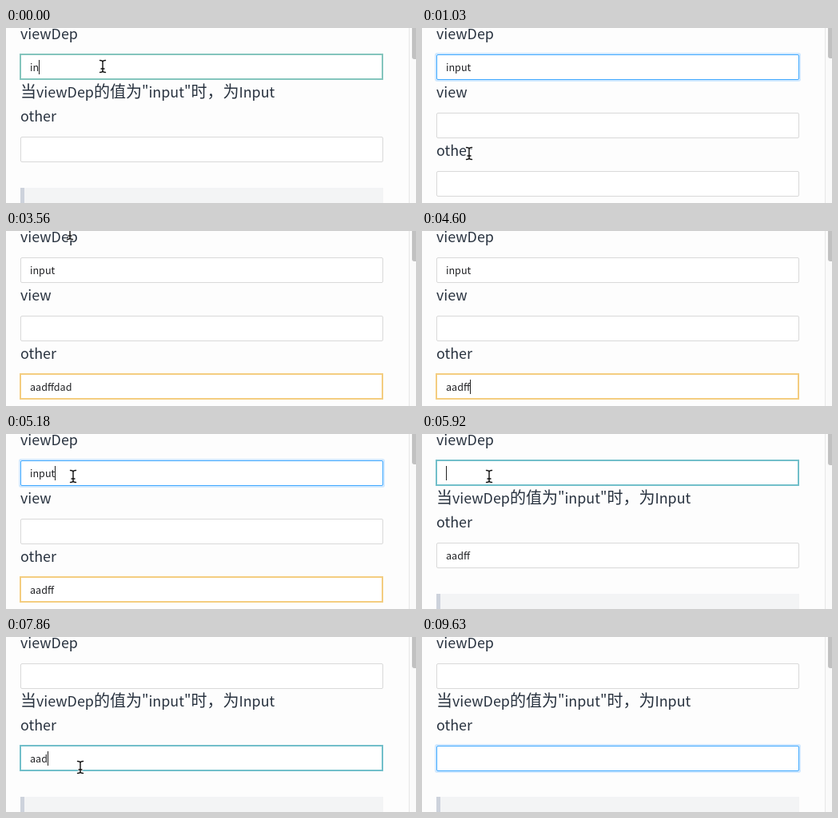
An HTML page for the animation above (9.73 s loop, 513x219 px).

```html
<!DOCTYPE html>
<html lang="zh-CN">
<head>
<meta charset="utf-8">
<style>
  html, body { margin: 0; width: 100%; height: 100%; overflow: hidden; background: #fdfdfd; }
  svg { display: block; }
  text { font-family: "Noto Sans CJK SC", "Noto Sans CJK", "Noto Sans", sans-serif; }
  .label { font-size: 17.9px; fill: #28323f; }
  .label .han { font-size: 20px; }
  .value { font-size: 12.55px; fill: #202124; }
</style>
</head>
<body>
<svg id="stage" width="513" height="219" viewBox="0 0 513 219">
  <g id="quote">
    <rect x="18" y="200" width="454" height="19" fill="#f3f4f5"/>
    <rect x="18" y="200" width="5" height="19" fill="#cdd2dc"/>
  </g>
  <text class="label" x="18" y="14">viewDep</text>
  <text class="label" x="18" y="87" id="viewLabel">view</text>
  <text class="label" x="18" y="87" id="hint"><tspan class="han">当</tspan>viewDep<tspan class="han">的值为</tspan>"input"<tspan class="han">时，为</tspan>Input</text>
  <text class="label" x="18" id="otherLabel">other</text>
  <g id="fields"></g>
  <rect x="504" width="9" height="219" fill="#fafafa"/>
  <rect x="504" width="1" height="219" fill="#e7e7e7"/>
  <rect id="thumb" x="508" y="-10" width="9" rx="3" fill="#c1c1c1"/>
  <g id="mouse" fill="none" stroke-linecap="round">
    <path d="M-3.5-7.5Q0-7.5 0-5.5Q0-7.5 3.5-7.5M0-5.5V5.5M-3.5 7.5Q0 7.5 0 5.5Q0 7.5 3.5 7.5M-2 3H2" stroke="#fff" stroke-width="3"/>
    <path d="M-3.5-7.5Q0-7.5 0-5.5Q0-7.5 3.5-7.5M0-5.5V5.5M-3.5 7.5Q0 7.5 0 5.5Q0 7.5 3.5 7.5M-2 3H2" stroke="#111" stroke-width="1.4"/>
  </g>
</svg>
<script>
const LOOP = 9730;
const BLUE = 'blue', GREY = 'grey';
const TEAL = '#84c5bd', AQUA = '#72bfca', GREEN = '#a7c8b3', AMBER = '#f4cd80';

// Each entry changes part of the state at its time; the rest carries over.
const timeline = [
  [0, { dep: 'in', other: '', depRing: TEAL, otherRing: GREY, caret: 'dep', mouse: [121, 48], typo: false }],
  [150, { dep: 'inp' }],
  [290, { dep: 'input' }],
  [880, { depRing: BLUE, caret: '', mouse: [98, 92] }],
  [1030, { mouse: [59, 157] }],
  [1330, { mouse: [55, 178] }],
  [1480, { mouse: [52, 200] }],
  [1630, { depRing: GREY, otherRing: BLUE, caret: 'other' }],
  [1920, { other: 'a' }],
  [2070, { other: 'aa', otherRing: GREEN }],
  [2370, { other: 'aadf' }],
  [2670, { other: 'aadffd', otherRing: AMBER }],
  [2970, { other: 'aadffdad' }],
  [3120, { mouse: [58, 160] }],
  [3270, { mouse: [68, 90], caret: '' }],
  [3410, { mouse: [76, 30] }],
  [3560, { mouse: [80, 3] }],
  [3700, { mouse: null, caret: 'other' }],
  [4150, { other: 'aadffda' }],
  [4300, { other: 'aadffd' }],
  [4450, { other: 'aadff' }],
  [4740, { mouse: [81, 12] }],
  [4890, { mouse: [83, 38] }],
  [5040, { mouse: [84, 53], depRing: BLUE, caret: 'dep' }],
  [5330, { dep: 'inpu', otherRing: GREY }],
  [5480, { dep: 'inp' }],
  [5630, { dep: 'in' }],
  [5780, { dep: 'i', depRing: AQUA }],
  [5920, { dep: '' }],
  [6520, { mouse: [87, 110] }],
  [6670, { mouse: [91, 165] }],
  [6820, { mouse: [93, 183] }],
  [6960, { mouse: [93, 163], otherRing: AQUA, caret: 'other', typo: true }],
  [7260, { depRing: GREY }],
  [7710, { other: 'aadf', typo: false }],
  [7860, { other: 'aad' }],
  [8010, { other: 'aa' }],
  [8160, { other: 'a' }],
  [8310, { other: '' }],
  [8610, { otherRing: BLUE }],
  [8760, { mouse: null }],
  [8900, { caret: '' }],
  [9200, { caret: 'other' }],
  [9630, { caret: '' }]
];

const $ = id => document.getElementById(id);
const show = (node, on) => node.setAttribute('visibility', on ? 'visible' : 'hidden');

function add(parent, tag, attrs) {
  const node = document.createElementNS('http://www.w3.org/2000/svg', tag);
  for (const key in attrs) node.setAttribute(key, attrs[key]);
  return parent.appendChild(node);
}

function makeField() {
  const group = add($('fields'), 'g', {});
  return {
    group,
    glow: add(group, 'rect', { x: -2, y: -2, width: 458, height: 36, rx: 3, fill: '#d1e9ff' }),
    box: add(group, 'rect', { x: .5, y: .5, width: 453, height: 31, rx: 1.5, fill: '#fff' }),
    ring: add(group, 'rect', { x: 0, y: 0, width: 453, height: 31, fill: '#fff', 'stroke-width': 2 }),
    text: add(group, 'text', { class: 'value', x: 12, y: 21 }),
    squiggle: add(group, 'path', { d: 'M13 24H42', stroke: '#e0524c', 'stroke-width': 2, 'stroke-dasharray': '2 1.3' }),
    caret: add(group, 'rect', { y: 7, width: 1, height: 18, fill: '#222' })
  };
}

const depField = makeField(), viewField = makeField(), otherField = makeField();

function drawField(field, y, value, ring, caret, typo) {
  const plain = ring === GREY || ring === BLUE;
  field.group.setAttribute('transform', `translate(18 ${y})`);
  field.text.textContent = value;
  field.box.setAttribute('stroke', ring === BLUE ? '#40a9ff' : '#d9d9d9');
  field.ring.setAttribute('stroke', plain ? 'none' : ring);
  show(field.glow, ring === BLUE);
  show(field.box, plain);
  show(field.ring, !plain);
  show(field.squiggle, typo);
  show(field.caret, caret);
  field.caret.setAttribute('x', 12 + (value ? Math.round(field.text.getComputedTextLength()) : 0));
}

function draw(time) {
  const state = {};
  for (const [start, change] of timeline) {
    if (start <= time) Object.assign(state, change);
  }
  const asInput = state.dep === 'input';
  const otherY = asInput ? 179 : 136;

  show($('viewLabel'), asInput);
  show($('hint'), !asInput);
  show($('quote'), !asInput);
  $('otherLabel').setAttribute('y', otherY - 19);
  $('thumb').setAttribute('height', asInput ? 48 : 49);

  drawField(depField, 33, state.dep, state.depRing, state.caret === 'dep', false);
  drawField(viewField, 106, '', GREY, false, false);
  viewField.group.setAttribute('display', asInput ? 'inline' : 'none');
  drawField(otherField, otherY, state.other, state.otherRing, state.caret === 'other', state.typo);

  show($('mouse'), state.mouse);
  if (state.mouse) $('mouse').setAttribute('transform', `translate(${state.mouse})`);
}

const began = performance.now();
function tick() {
  draw((performance.now() - began) % LOOP);
  requestAnimationFrame(tick);
}
tick();
</script>
</body>
</html>
```
